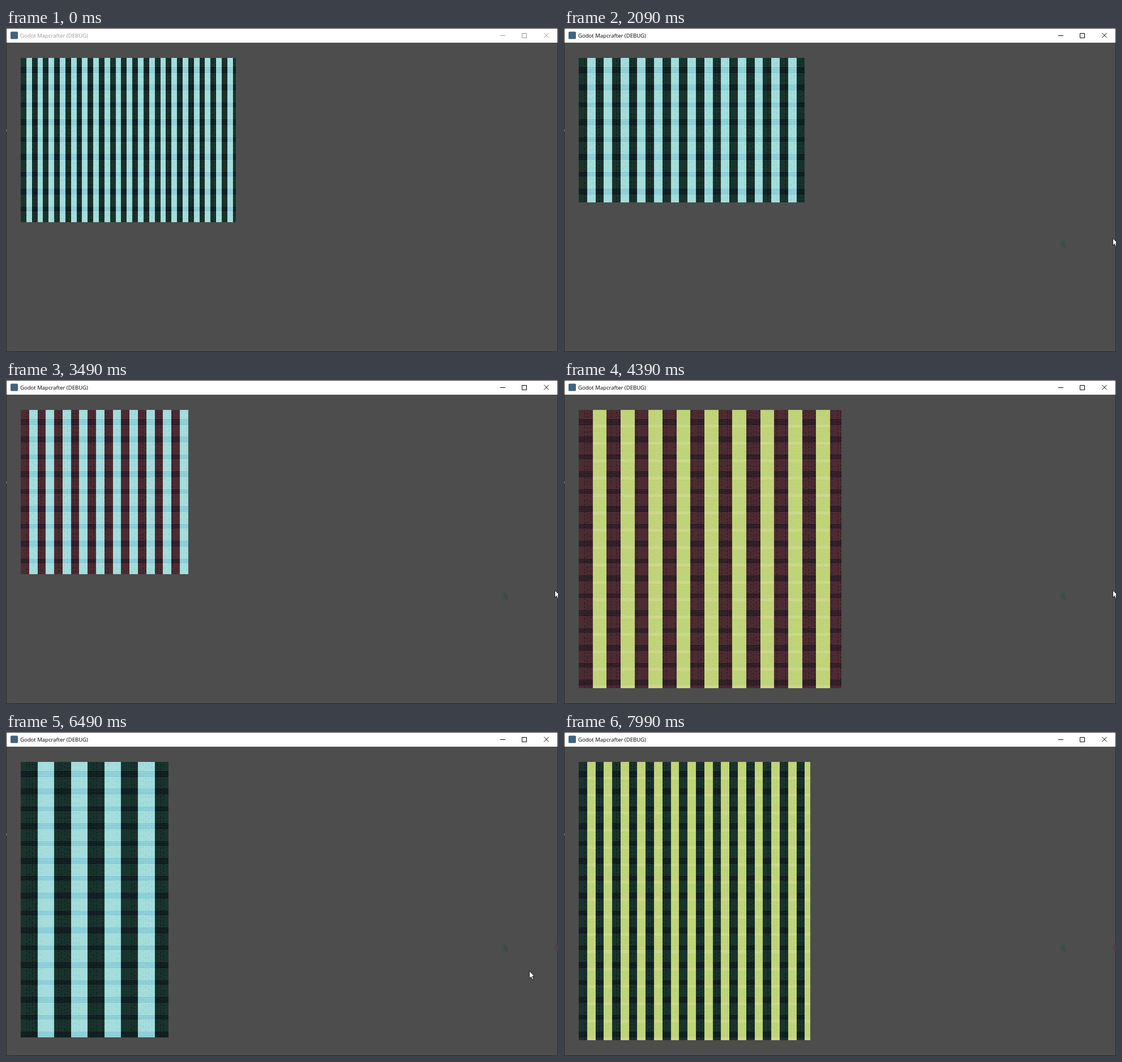
An HTML page with a canvas that plays this animation: 975x574 px, repeating every 8590 ms.

```html
<!DOCTYPE html>
<html lang="en">
<head>
<meta charset="utf-8">
<title>Godot Mapcrafter (DEBUG)</title>
<style>
html, body { margin: 0; width: 100%; height: 100%; overflow: hidden; background: #4d4d4d; }
#stage { position: relative; width: 975px; height: 574px; overflow: hidden; }
canvas, svg { position: absolute; left: 0; top: 0; display: block; }
text { font: 9.55px "Open Sans", "Noto Sans", sans-serif; }
</style>
</head>
<body>
<div id="stage">
<canvas id="map" width="975" height="574"></canvas>
<svg width="975" height="574" viewBox="0 0 975 574">
  <rect width="975" height="26" fill="#fff"/>
  <rect x=".5" y=".5" width="974" height="573" fill="none" stroke="#2b2b2b"/>
  <rect y="180" width="1" height="3" fill="#8a8a8a"/>
  <rect x="8" y="6.5" width="13" height="13" rx="1.5" fill="#3f6380"/>
  <g id="bar">
    <text x="25" y="17" fill="currentColor">Godot Mapcrafter (DEBUG)</text>
    <path d="M873 13.5h9M911.5 9.5h8v8h-8zM950.3 8.8l8.6 8.6M958.9 8.8l-8.6 8.6" fill="none" stroke="currentColor"/>
  </g>
  <path id="green" d="M879 375l6 4 1 11-4-1-3-2z" fill="#3d4b48"/>
  <path id="red" d="M970 373l5 4v10l-6 0z" fill="#563f43"/>
  <path id="cursor" d="M.5.5v12.9l3-2.8 2.2 4.9 2.2-1-2.2-4.7h3.7z" fill="#fff" stroke="#111" stroke-width=".9"/>
</svg>
</div>
<script>
const LOOP = 8590, CELL = 4.9325, X0 = 25.91, Y0 = 53;
const $ = id => document.getElementById(id);
const ctx = $('map').getContext('2d');

// base colour, line colour, dash opacity
const TILES = {
  g: ['#19332d', '#090a14', .85],
  n: ['#183038', '#090a14', .7],
  m: ['#4d2b32', '#14121e', .9],
  c: ['#a4dddb', '#73bed3', .6],
  y: ['#d0da91', '#a8ca58', .5]
};

// start, columns, rows, stripe width, tile pair
const MAPS = [
  [0, 77, 59, 2, 'gc'], [290, 120, 40, 4, 'my'], [590, 64, 92, 3, 'gy'],
  [890, 101, 70, 7, 'mc'], [1190, 88, 46, 2, 'gy'], [1390, 2, 1, 1, ''],
  [1490, 72, 85, 5, 'gc'], [1790, 96, 60, 4, 'my'], [2090, 81, 52, 3, 'gc'],
  [2390, 113, 76, 6, 'gy'], [2690, 134, 51, 2, 'mc'], [2890, 96, 30, 1, 'ny'],
  [3190, 145, 48, 4, 'gc'], [3490, 60, 59, 3, 'mc'], [3990, 109, 87, 7, 'gy'],
  [4290, 94, 100, 5, 'my'], [4590, 70, 44, 3, 'gc'], [4890, 118, 90, 6, 'gy'],
  [5190, 94, 63, 8, 'my'], [5690, 84, 93, 4, 'gc'], [5990, 130, 57, 2, 'my'],
  [6290, 66, 72, 5, 'gy'], [6490, 53, 99, 6, 'gc'], [6690, 112, 64, 4, 'my'],
  [7090, 75, 88, 2, 'gc'], [7390, 90, 72, 7, 'mc'], [7690, 109, 80, 5, 'gc'],
  [7990, 83, 100, 3, 'gy']
];

// time, x, y of the pointer
const PATH = [
  [90, 878, 374], [890, 940, 396], [1290, 961, 388], [1590, 961, 388],
  [1790, 962, 372], [2000, 962, 372], [2090, 969, 372], [4490, 969, 372],
  [5290, 947, 385], [5390, 946, 388], [5600, 946, 388], [6290, 924, 420],
  [6490, 924, 423], [6600, 924, 423], [7390, 960, 580]
];

const hash = n => {
  const s = Math.sin(n * 127.1) * 43758.5453;
  return s - Math.floor(s);
};
const px = i => Math.round(X0 + i * CELL);

function rows(tile, right, bottom, narrow) {
  const line = y => ctx.fillRect(px(0), y, right - px(0), 1.2);
  if (tile === 'y') {
    for (let i = 0, y = Y0 + 1; y < bottom; i++, y += 2.564) {
      ctx.globalAlpha = i % 12 > 9 ? .25 : .85;
      line(y);
    }
    return;
  }
  for (let k = 0, mid = 74.5; mid < bottom + 6; k++, mid += 30.77) {
    const count = k % 2 || k === 0 ? 4 : 3;
    for (let j = 0; j < count; j++) line(mid + (j - (count - 1) / 2) * 2.7 - .6);
  }
  if (narrow) {
    ctx.globalAlpha = .5;
    for (let y = Y0 + 1; y < bottom; y += CELL / 2) line(y);
  }
}

function dashes(tile, right, bottom) {
  ctx.globalAlpha = TILES[tile][2];
  ctx.lineWidth = .9;
  for (let i = 1, x = X0 + 5.5; x < right; i++, x += 5.14) {
    const r = hash(i);
    if (r < .35) continue;
    const sparse = tile === 'c' || tile === 'y' ? 5 : 0;
    ctx.setLineDash([3, 3 + sparse, 2, 2 + 4 * r, 4, 3 + sparse * r]);
    ctx.lineDashOffset = r * 20;
    ctx.beginPath();
    ctx.moveTo(x, Y0);
    ctx.lineTo(x, bottom);
    ctx.stroke();
  }
}

function drawMap([, cols, depth, wide, pair]) {
  ctx.fillStyle = '#4d4d4d';
  ctx.fillRect(0, 0, 975, 574);
  if (!pair) {
    ctx.fillStyle = TILES.c[1];
    ctx.fillRect(30, 53, 5, 5);
    return;
  }
  const right = px(cols), bottom = Math.round(Y0 + depth * CELL);
  [...pair].forEach((tile, side) => {
    const [base, ink] = TILES[tile];
    ctx.save();
    ctx.beginPath();
    for (let i = side * wide; i < cols; i += 2 * wide) {
      const x = px(i);
      ctx.rect(x, Y0, px(Math.min(i + wide, cols)) - x, bottom - Y0);
    }
    ctx.clip();
    ctx.fillStyle = base;
    ctx.fillRect(px(0), Y0, right - px(0), bottom - Y0);
    ctx.fillStyle = ctx.strokeStyle = ink;
    rows(tile, right, bottom, wide === 1);
    dashes(tile, right, bottom);
    ctx.restore();
  });
}

function pointerAt(t) {
  const i = PATH.findIndex(p => p[0] > t);
  if (i < 1) return null;
  const [a, x, y] = PATH[i - 1], [b, u, v] = PATH[i], k = (t - a) / (b - a);
  return [Math.round(x + (u - x) * k), Math.round(y + (v - y) * k)];
}

const show = (id, on) => $(id).setAttribute('visibility', on ? 'visible' : 'hidden');
let current;

function render(t) {
  const map = MAPS.filter(m => m[0] <= t).pop();
  if (map !== current) drawMap(current = map);
  const tick = t < 100 ? 0 : Math.floor((t + 10) / 100) * 100 - 10;
  const at = pointerAt(tick);
  show('cursor', at);
  if (at) $('cursor').setAttribute('transform', `translate(${at})`);
  show('green', t >= 190);
  show('red', t >= 4590);
  $('bar').setAttribute('color', t < 100 ? '#999' : '#000');
}

const start = performance.now();
function loop() {
  render((performance.now() - start) % LOOP);
  requestAnimationFrame(loop);
}
loop();
</script>
</body>
</html>
```
